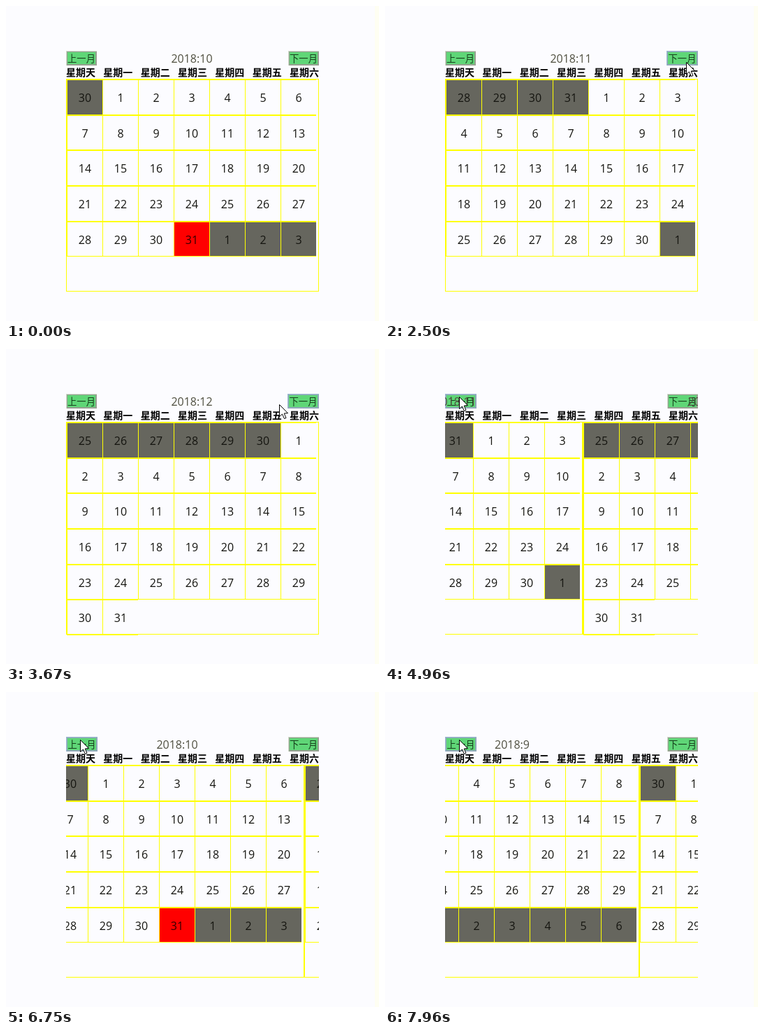
Animation, 534 px wide and 450 px high, one loop 8 s. Source, as an HTML page with a canvas:

```html
<!DOCTYPE html>
<html lang="zh">
<head>
<meta charset="utf-8">
<style>
  html, body { margin: 0; width: 100%; height: 100%; overflow: hidden; background: #fcfcff; }
  canvas { display: block; }
</style>
</head>
<body>
<canvas id="stage" width="534" height="450"></canvas>
<script>
const ctx = document.getElementById('stage').getContext('2d');
const LOOP = 8000, SLIDE = 1000;
const LEFT = 86, WIDTH = 362;
const CJK = '"Noto Sans CJK SC", "Noto Sans CJK", sans-serif';
const DIGITS = '16px "Open Sans", "Noto Sans", sans-serif';
const ROWS = [105, 156, 206, 257, 308, 358, 409];

// Each click slides the strip of months by one page.
const clicks = [
  { at: 1068, step: 1 },
  { at: 2540, step: 1 },
  { at: 4433, step: -1 },
  { at: 5905, step: -1 },
  { at: 7280, step: -1 }
];

// First date shown on each page and the number of cells.
const pages = {
  9: { start: new Date(2018, 8, 2), cells: 35 },
  10: { start: new Date(2018, 8, 30), cells: 35 },
  11: { start: new Date(2018, 9, 28), cells: 35 },
  12: { start: new Date(2018, 10, 25), cells: 37 }
};

const swing = (t, start, duration) => {
  const p = Math.min(1, Math.max(0, (t - start) / duration));
  return 0.5 - Math.cos(p * Math.PI) / 2;
};

function rect(x, y, w, h, color) {
  ctx.fillStyle = color;
  ctx.fillRect(x, y, w, h);
}

function text(str, x, y, font, color, align = 'center') {
  ctx.font = font;
  ctx.fillStyle = color;
  ctx.textAlign = align;
  ctx.fillText(str, x, y);
}

function button(label, x, width, focused) {
  rect(x, 64, width, 21, focused ? '#9ab8d0' : '#d0dccc');
  rect(x + 1, 65, width - 1, 20, focused ? '#8fa8b8' : '#95a090');
  rect(x + 2, 66, width - 4, 17, '#5fd677');
  text(label, x + width / 2, 80, '13.33px ' + CJK, '#173f1c');
}

function drawCell(page, month, i, left) {
  const row = Math.floor(i / 7);
  const x = left + 1 + 51 * (i % 7), y = ROWS[row], bottom = ROWS[row + 1];
  const date = new Date(page.start);
  date.setDate(date.getDate() + i);
  const outside = date.getMonth() + 1 !== month;
  const today = month === 10 && !outside && date.getDate() === 31;
  if (outside || today) rect(x, y, 51, bottom - y, today ? '#f00' : '#66665e');
  rect(x, y, 1, bottom - y, '#ff0');
  rect(x, y, 51, 1, '#ff0');
  rect(x, bottom - 1, 51, 1, '#ff0');
  text(date.getDate(), x + 26, y + 32, DIGITS, today ? '#300' : '#151510');
}

function drawPage(month, left) {
  const page = pages[month];
  text('2018:' + month, left + 180, 81, DIGITS, '#505040');
  for (let i = 0; i < page.cells; i++) drawCell(page, month, i, left);
  ctx.strokeStyle = '#ff0';
  ctx.lineWidth = 1;
  ctx.strokeRect(left + 0.5, 104.5, WIDTH - 1, 303);
}

function drawCursor(t) {
  if (t < 40) return;
  const enter = swing(t, 40, 760), cross = swing(t, 3500, 750);
  const x = Math.round(507 - 76 * enter - 325 * cross);
  const y = Math.round(396 - 316 * enter - 12 * cross);
  const arrow = [[0, 0], [0, 17], [4, 13.5], [7, 20], [9.5, 19], [6.7, 12.5], [12, 12.2]];
  ctx.beginPath();
  arrow.forEach(([dx, dy]) => ctx.lineTo(x + dx + 0.5, y + dy + 0.5));
  ctx.closePath();
  ctx.fillStyle = '#fff';
  ctx.fill();
  ctx.strokeStyle = '#000';
  ctx.lineWidth = 1;
  ctx.stroke();
}

function draw(t) {
  rect(0, 0, 534, 450, '#fcfcff');
  rect(528, 0, 6, 450, '#fefef2');

  const nextFocused = t >= clicks[0].at && t < clicks[2].at;
  const prevFocused = t >= clicks[2].at;
  button('上一月', LEFT, prevFocused ? 45 : 44, prevFocused);
  button('下一月', nextFocused ? 403 : 404, nextFocused ? 45 : 44, nextFocused);
  [...'天一二三四五六'].forEach((day, i) =>
    text('星期' + day, LEFT + i * 320 / 6, 100, 'bold 14px ' + CJK, '#000', 'left'));

  const position = clicks.reduce((sum, c) => sum + c.step * swing(t, c.at, SLIDE), 10);
  ctx.save();
  ctx.beginPath();
  ctx.rect(LEFT, 60, WIDTH, 360);
  ctx.clip();
  for (let month = 9; month <= 12; month++) {
    const left = LEFT + Math.round((month - position) * WIDTH);
    if (Math.abs(left - LEFT) < WIDTH) drawPage(month, left);
  }
  ctx.restore();
  drawCursor(t);
}

function tick() {
  draw(performance.now() % LOOP);
  requestAnimationFrame(tick);
}
tick();
</script>
</body>
</html>
```
